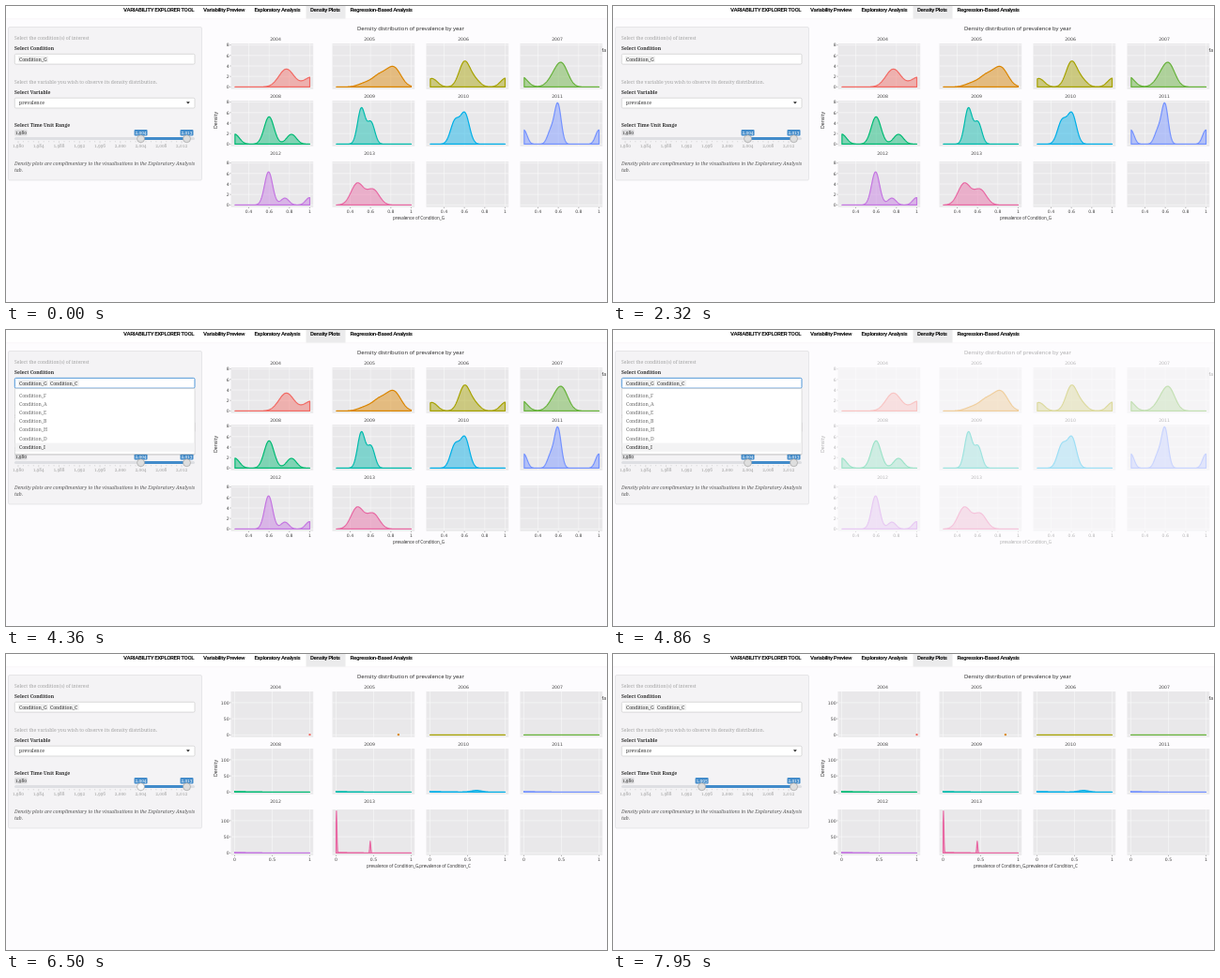
An HTML page that plays this animation: 640 px wide and 316 px high, repeating every 8 s.

```html
<!DOCTYPE html>
<html lang="en">
<head>
<meta charset="utf-8">
<title>Density plots</title>
<style>
  html, body { margin: 0; width: 100%; height: 100%; overflow: hidden; background: #fdfcfe; }
  svg { display: block; width: 100%; height: 100%; }
  text { white-space: pre; }
  .nav { font: 700 6.2px Roboto, sans-serif; letter-spacing: -.4px; fill: #111; }
  .serif { font: 5.1px "Noto Serif", serif; fill: #333; font-variant-numeric: oldstyle-nums; }
  .bold { font-weight: 700; }
  .hint { fill: #a3a3a3; }
  .note { font-style: italic; fill: #555; }
  .year { font-size: 4.7px; }
  .tick { font: 4.6px "DejaVu Sans", sans-serif; fill: #444; }
  .title { font: 500 5.9px "Open Sans", sans-serif; fill: #222; }
  .axis { font: 4.5px "Open Sans", sans-serif; fill: #222; }
  .middle { text-anchor: middle; }
  .end { text-anchor: end; }
</style>
</head>
<body>
<svg id="stage" viewBox="0 0 640 316"></svg>
<script>
const LOOP = 8000;
const OPEN = 2800, PICK = 4250, FADE = 4640, CLOSE = 5350, REDRAW = 6100, DRAG = 6750, DROP = 7500;
const HANDLE = 'fill="#dedede" stroke="#999" stroke-width=".6"';

// Bumps per year as [centre, height]
const SINGLE = [
  [[.77, 3.4], [1.02, 1.9]],
  [[.55, .7], [.69, 2.1], [.83, 3.6]],
  [[.28, 1.6], [.6, 4.7], [.7, 1.3], [1.01, 1.7]],
  [[.23, 2.1], [.55, 1.4], [.635, 4.1]],
  [[.26, 1.9], [.6, 5.2], [.82, 1.85]],
  [[.51, 6.8], [.605, 4.1]],
  [[.507, 4.3], [.605, 5.7]],
  [[.26, 2.7], [.525, 2.4], [.595, 7.6], [1, 2.7]],
  [[.595, 6.3], [.755, 1.3], [1, 1.4]],
  [[.47, 4.1], [.625, 2.9]]
];
const COMBINED = { 6: [[.62, 5]], 9: [[.005, 128], [.455, 36]] };

const gauss = (x, bumps, spread) =>
  bumps.reduce((sum, [m, h]) => sum + h * Math.exp(-(((x - m) / spread) ** 2) / 2), 0);
const color = i => `oklch(.69 .17 ${25 + 35 * i + 14 * Math.sin(.9 * i)})`;

const text = (x, y, label, cls, extra = '') => `<text x="${x}" y="${y}" class="${cls}" ${extra}>${label}</text>`;
const rect = (x, y, w, h, fill, extra = '') =>
  `<rect x="${x}" y="${y}" width="${w}" height="${h}" fill="${fill}" ${extra}/>`;
const line = (x1, y1, x2, y2, stroke, width) =>
  `<path d="M${x1} ${y1}L${x2} ${y2}" stroke="${stroke}" stroke-width="${width}"/>`;

function curve(i, from, base, chart, density) {
  const points = [];
  for (let k = 0; k <= 200; k++) {
    const v = from + (1 - from) * k / 200;
    points.push(`${chart.x(v)} ${base - chart.unit * density(v)}`);
  }
  return `<path d="M${chart.x(from)} ${base}L${points.join('L')}V${base}Z" fill="${color(i)}" fill-opacity=".45"
    stroke="${color(i)}" stroke-width="1.2" stroke-linejoin="round"/>`;
}

const single = {
  x: v => 258.5 + (v - .4) * 108.3, unit: 5.6,
  xTicks: [.4, .6, .8, 1], yTicks: [0, 2, 4, 6, 8],
  caption: 'prevalence of Condition_G',
  shape(i, base) {
    const peak = Math.max(...SINGLE[i].map(bump => bump[1]));
    return curve(i, .265, base, this, v => gauss(v, SINGLE[i], .25 / peak));
  }
};

const combined = {
  x: v => 243.5 + v * 80, unit: .345,
  xTicks: [0, .5, 1], yTicks: [0, 50, 100],
  caption: 'prevalence of Condition_G,prevalence of Condition_C',
  shape(i, base) {
    if (i < 2) return `<circle cx="${this.x(i ? .83 : 1)}" cy="${base - .3}" r="1.2" fill="${color(i)}"/>`;
    const spread = i === 6 ? .07 : .006, slope = i < 4 ? 0 : 2;
    return curve(i, 0, base, this, v => gauss(v, COMBINED[i] || [], spread) + slope * (1 - v) ** 3);
  }
};

function facet(chart, i) {
  const col = i % 4, row = i >> 2, top = [40, 101, 166][row], base = top + 46.4;
  let out = rect(239.5, top, 87.7, 48.7, '#e9e8ea');
  for (const v of chart.xTicks) {
    const x = chart.x(v);
    out += line(x, top, x, top + 48.7, '#f8f8f9', .6);
    if (row === 2) out += line(x, 214.7, x, 216, '#444', .4) + text(x, 221.2, v, 'tick middle');
  }
  for (const v of chart.yTicks) {
    const y = base - v * chart.unit;
    out += line(239.5, y, 327.2, y, '#f8f8f9', .6);
    if (col === 0) out += line(238.3, y, 239.5, y, '#444', .4) + text(237.6, y + 1.7, v, 'tick end');
  }
  const left = col * 100 + (col ? 8 : 0);
  const label = i < 10 ? text(287 + 100 * col, 36.8 + 61.3 * row, 2004 + i, 'tick middle') : '';
  return `<g transform="translate(${left} 0)">${out}${i < 10 ? chart.shape(i, base) : ''}</g>${label}`;
}

function plot(chart) {
  let out = text(431, 26.4, 'Density distribution of prevalence by year', 'title middle');
  for (let i = 0; i < 12; i++) out += facet(chart, i);
  out += text(0, 0, 'Density', 'axis middle', 'transform="translate(225.3 122) rotate(-90)" style="font-size:5.2px"');
  out += text(439.5, 228.4, chart.caption, 'axis middle', 'clip-path="url(#captionClip)"');
  return out + text(634.6, 49, 'fa', 'title bold', 'style="font-size:5px"');
}

const yearX = year => 13 + (year - 1980) * 5.44;
const commas = year => year.toLocaleString('en-US');

function badge(year, id) {
  return `<g id="${id}" transform="translate(${yearX(year)} 0)">${rect(-7, 132, 14, 6.5, '#428bca', 'rx="1"')}
    ${text(0, 137, commas(year), 'serif year middle', 'style="fill:#fff"')}
    <circle cy="141.7" r="4" ${HANDLE}/></g>`;
}

function navigation() {
  const tabs = [[125, 'VARIABILITY EXPLORER TOOL'], [210, 'Variability Preview'], [264.5, 'Exploratory Analysis'],
                [324, 'Density Plots'], [366.5, 'Regression-Based Analysis']];
  return rect(0, 0, 640, 13.5, '#fff') + rect(319.5, 0, 42, 13.7, '#ebebec') +
    line(0, 13.8, 640, 13.8, '#f1f0f2', .6) + tabs.map(([x, label]) => text(x, 6.2, label, 'nav')).join('');
}

const chip = (x, label) => rect(x - 1, 53.3, 31.8, 6.8, '#efefef') + text(x, 58.5, label, 'serif');

function sidebar() {
  let out = rect(2.5, 22.5, 206, 163.5, '#f4f3f5', 'stroke="#dfdfe1" stroke-width=".7" rx="1.5"');
  out += text(9, 36, 'Select the condition(s) of interest', 'serif hint');
  out += text(9, 47, 'Select Condition', 'serif bold');
  out += rect(9.3, 51.3, 191.7, 10.8, '#fff', 'id="field" rx="1.3"');
  out += chip(14, 'Condition_G') + `<g id="second">${chip(47, 'Condition_C')}</g>`;
  out += `<g id="caret">${line(46, 53.6, 46, 59.8, '#333', .5)}</g>`;
  out += text(9, 83, 'Select the variable you wish to observe its density distribution.', 'serif hint');
  out += text(9, 94, 'Select Variable', 'serif bold');
  out += rect(9.3, 98.2, 191.7, 10.8, '#fff', 'rx="1.3" stroke="#ccc" stroke-width=".7"');
  out += text(14, 105.3, 'prevalence', 'serif') + '<path d="M192 102.3h3.8l-1.9 2.3z" fill="#222"/>';
  out += text(9, 129, 'Select Time Unit Range', 'serif bold');
  out += rect(9.3, 132, 13.2, 6.5, '#dcdcde', 'rx="1"') + text(16, 137, '1,980', 'serif year middle');
  out += rect(9, 140, 192, 3, '#dedfe3', 'rx="1.5"');
  out += `<path id="range" stroke="#428bca" stroke-width="3"/>`;
  for (let year = 1980; year <= 2013; year++) {
    const x = yearX(year), major = year % 4 === 0;
    out += line(x, 144, x, major ? 146.4 : 145.3, '#aaa', .35);
    if (major) out += text(x, 151, commas(year), 'serif hint year middle');
  }
  out += badge(2013, 'high') + badge(2004, 'low');
  out += text(9, 170, 'Density plots are complimentary to the visualisations in the Exploratory Analysis', 'serif note');
  return out + text(9, 177.3, 'tab.', 'serif note');
}

function dropdown(letters, active) {
  const row = 9.2;
  let out = rect(9.6, 64, 191.6, 69.8, '#000', 'opacity=".13" rx="1"') +
    rect(9.3, 62.7, 191.7, 70, '#fff', 'stroke="#ccc" stroke-width=".6"');
  [...letters].forEach((letter, i) => {
    const on = letter === active;
    if (on) out += rect(9.7, 65.4 + row * i, 190.9, row, '#f3f3f4');
    out += text(14, 71.6 + row * i, 'Condition_' + letter, 'serif', `style="fill:${on ? '#222' : '#666'}"`);
  });
  if (letters.includes('C')) out += rect(195.3, 65.3, 3.8, 57.5, '#b9b9bb', 'rx="1.9"');
  return out;
}

document.getElementById('stage').innerHTML =
  `<clipPath id="captionClip"><path d="M230 223.8H640V229H230Z"/></clipPath>
  ${rect(0, 0, 640, 316, '#fdfcfe')}${navigation()}${sidebar()}
  <g id="before">${plot(single)}</g><g id="after">${plot(combined)}</g><g id="menu"></g>`;

const $ = id => document.getElementById(id);
const show = (id, visible) => $(id).setAttribute('display', visible ? 'inline' : 'none');
const ease = (t, from, to) => {
  const v = Math.max(0, Math.min(1, (t - from) / (to - from)));
  return v * v * (3 - 2 * v);
};
let menuState = '';

function activeItem(t) {
  if (t < 3250) return 'F';
  if (t < 3850) return 'A';
  if (t < 4050) return 'E';
  return t < PICK ? 'C' : 'I';
}

function draw(t) {
  const open = t >= OPEN && t < CLOSE, picked = t >= PICK;
  show('second', picked);
  show('caret', open && !picked);
  show('menu', open);
  $('field').setAttribute('stroke', open ? '#4f96d8' : '#ccc');
  $('field').setAttribute('stroke-width', open ? 1 : .7);

  const state = (picked ? 'FAEBHDI' : 'FAECBHD') + activeItem(t);
  if (state !== menuState) {
    $('menu').innerHTML = dropdown(state.slice(0, 7), state[7]);
    menuState = state;
  }

  show('before', t < REDRAW);
  show('after', t >= REDRAW);
  $('before').setAttribute('opacity', 1 - .65 * ease(t, FADE, FADE + 250));

  const year = 2004 - Math.round(9 * ease(t, DRAG, DROP)), x = yearX(year);
  $('low').setAttribute('transform', `translate(${x} 0)`);
  $('low').querySelector('text').textContent = commas(year);
  $('low').querySelector('circle').setAttribute('fill', t > 6350 && t < DROP ? '#f8f8f8' : '#dedede');
  $('range').setAttribute('d', `M${x} 141.5H${yearX(2013)}`);
}

function tick() {
  draw(performance.now() % LOOP);
  requestAnimationFrame(tick);
}
tick();
</script>
</body>
</html>
```
